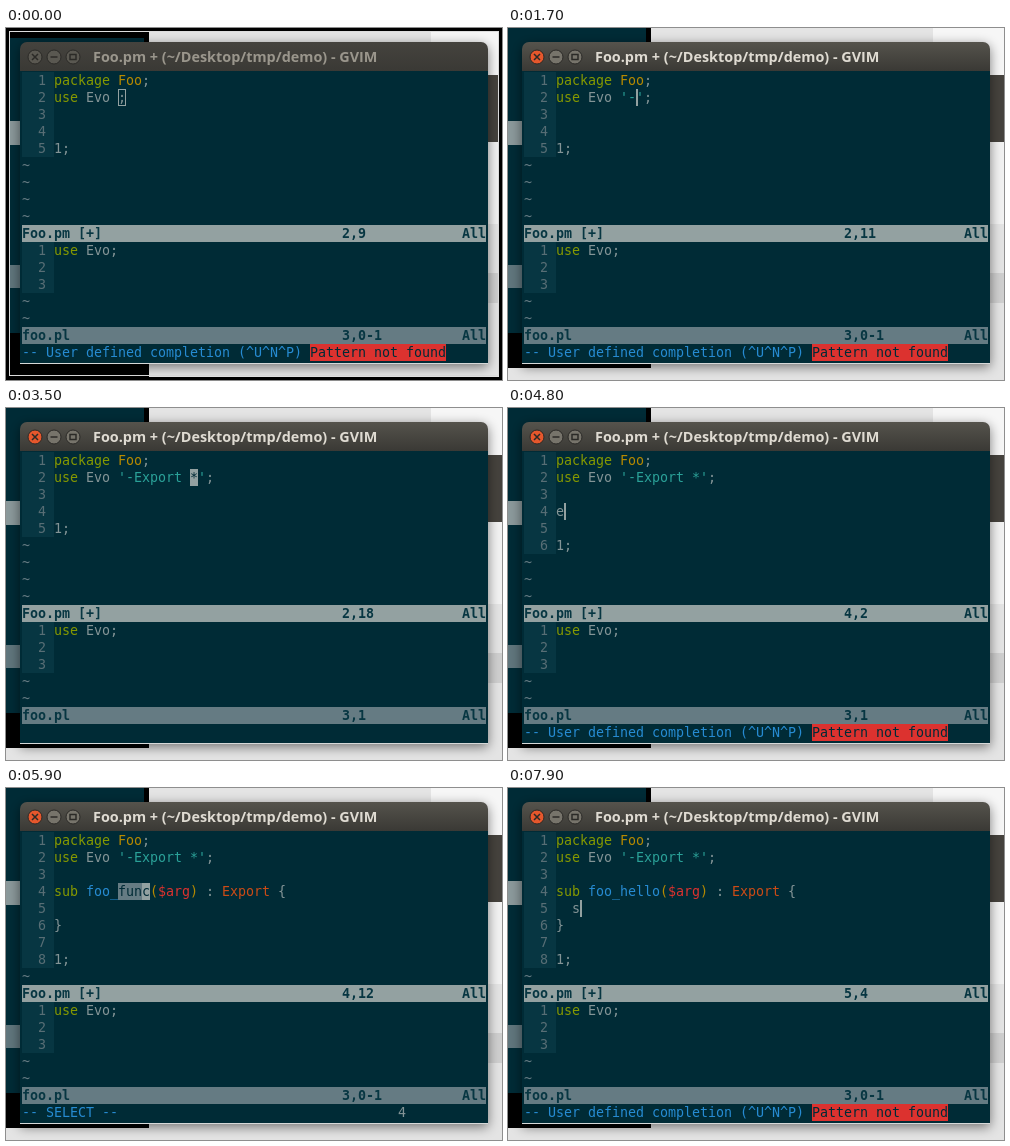
These frames come from a looping animation (496x352 px, 8000 ms). An HTML page with a canvas:

```html
<!DOCTYPE html>
<html lang="en">
<head>
<meta charset="utf-8">
<style>
html, body { margin: 0; width: 100%; height: 100%; overflow: hidden; background: #e4e4e4; }
canvas { display: block; }
</style>
</head>
<body>
<canvas width="496" height="352"></canvas>
<script>
const ctx = document.querySelector('canvas').getContext('2d');
const LOOP = 8000, X0 = 16, Y0 = 44, CW = 8, RH = 17;
const C = {
  bg: '#002b36', gutter: '#073642', num: '#586e75', dim: '#657b83', fg: '#839496',
  light: '#93a1a1', green: '#859900', yellow: '#b58900', orange: '#cb4b16',
  red: '#dc322f', cyan: '#2aa198', blue: '#268bd2'
};
const COMPLETION = '-- User defined completion (^U^N^P) ';
const ERROR = 'Pattern not found';
const SYNTAX = [
  [/^'/, C.cyan], [/^(use|package|sub)$/, C.green], [/^Foo$|^[()]$/, C.yellow],
  [/^foo_/, C.blue], [/^\$/, C.red], [/^Export$/, C.orange]
];

// Each step lists only what changes from the one before it.
const steps = [];
const step = (t, change) => steps.push({ ...steps.at(-1), ...change, t });
const sub = name => [`sub foo_${name}($arg) : Export {`, '', '}', ''];

step(0, { use: ';', body: [''], row: 2, col: 8, mode: 'hollow', msg: 'error', other: '3,0-1' });
step(100, { mode: 'insert' });
step(1300, { use: "'';", col: 9 });
const flags = '-Export *';
[1600, 1900, 2100, 2200, 2300, 2400, 2500, 2700, 2900].forEach((t, i) =>
  step(t, { use: `'${flags.slice(0, i + 1)}';`, col: 10 + i }));
step(3200, { col: 17, mode: 'normal', msg: '', other: '3,1' });
step(3800, { row: 3, col: 0 });
step(4300, { body: ['', ''], row: 4, mode: 'insert', msg: '-- INSERT --' });
[4700, 5000, 5200].forEach((t, i) =>
  step(t, { body: ['exp'.slice(0, i + 1), ''], col: i + 1, msg: 'error' }));
step(5500, { body: sub('func'), col: 11, mode: 'select', msg: '-- SELECT --', other: '3,0-1' });
[6200, 6400, 6600, 6700, 6900].forEach((t, i) =>
  step(t, { body: sub('hello'.slice(0, i + 1)), col: 9 + i, mode: 'insert', msg: 'error' }));
step(7300, { body: [sub('hello')[0], '  ', '}', ''], row: 5, col: 2, msg: '-- INSERT --' });
step(7800, { body: [sub('hello')[0], '  s', '}', ''], col: 3, msg: 'error' });

function rect(x, y, w, h, color) {
  ctx.fillStyle = color;
  ctx.fillRect(x, y, w, h);
}

function cells(row, col, n, color) {
  rect(X0 + col * CW, Y0 + row * RH, n * CW, RH, color);
}

function text(row, col, str, color, bold) {
  ctx.font = `${bold ? 'bold ' : ''}13.33px "DejaVu Sans Mono", monospace`;
  ctx.fillStyle = color;
  [...str].forEach((ch, i) => ctx.fillText(ch, X0 + (col + i) * CW, Y0 + row * RH + 13));
}

function code(row, number, str) {
  cells(row, 0, 4, C.gutter);
  text(row, 2, String(number), C.num);
  const tokens = /'[^']*'|\b(?:use|package|sub)\b|Foo|foo_\w*|\$\w+|Export|./g;
  for (const m of str.matchAll(tokens)) {
    const rule = SYNTAX.find(([re]) => re.test(m[0]));
    text(row, 4 + m.index, m[0], rule ? rule[1] : C.fg);
  }
}

function status(row, name, pos, color) {
  cells(row, 0, 58, color);
  text(row, 0, name, C.gutter, true);
  text(row, 40, pos, C.gutter, true);
  text(row, 55, 'All', C.gutter, true);
}

function mark(row, col, ch, back, color) {
  cells(row, col, 1, back);
  text(row, col, ch, color);
}

function desktop(framed) {
  rect(0, 0, 496, 352, '#e4e4e4');
  rect(425, 0, 71, 47, '#f6f6f6');
  rect(0, 0, 138, 305, C.bg);
  rect(138, 0, 5, 340, '#000');
  rect(0, 93, 15, 24, '#8b999b');
  rect(0, 237, 15, 23, '#60767d');
  rect(0, 305, 143, framed ? 47 : 35, '#000');
  rect(482, 47, 14, 67, '#45423d');
  rect(482, 114, 14, 82, '#f2f2f2');
  rect(482, 245, 14, 30, '#cfcfcf');
  if (!framed) return;
  rect(4, 4, 134, 6, '#000');
  ctx.lineWidth = 1;
  ctx.strokeStyle = '#ddd';
  ctx.strokeRect(3.5, 3.5, 489, 344);
  ctx.lineWidth = 3;
  ctx.strokeStyle = '#000';
  ctx.strokeRect(1.5, 1.5, 493, 349);
}

function button(x, fill, icon) {
  ctx.beginPath();
  ctx.arc(x, 29, 7, 0, 7);
  ctx.fillStyle = fill;
  ctx.fill();
  ctx.lineWidth = 1;
  ctx.strokeStyle = '#2b2a27';
  ctx.stroke();
  ctx.lineWidth = 1.5;
  ctx.stroke(new Path2D(`M${x} 29${icon}`));
}

function frame(focused) {
  ctx.save();
  ctx.shadowColor = 'rgba(0,0,0,.5)';
  ctx.shadowBlur = 12;
  ctx.shadowOffsetY = 3;
  const bar = ctx.createLinearGradient(0, 14, 0, 43);
  bar.addColorStop(0, focused ? '#55534c' : '#45433e');
  bar.addColorStop(1, '#3a3935');
  ctx.fillStyle = bar;
  ctx.beginPath();
  ctx.roundRect(14, 14, 468, 322, [7, 7, 0, 0]);
  ctx.fill();
  ctx.restore();
  rect(14, 43, 468, 292, C.bg);
  rect(14, 335, 468, 1, '#d5d8d8');
  const grey = focused ? '#77746b' : '#5a5851';
  button(29, focused ? '#e6572c' : grey, 'm-3-3l6 6m0-6l-6 6');
  button(48, grey, 'm-3.5 0h7');
  button(67, grey, 'm-3-2.5h6v5h-6z');
  ctx.font = 'bold 14.4px "Open Sans", sans-serif';
  ctx.fillStyle = focused ? '#dfdbd2' : '#9a968c';
  ctx.fillText('Foo.pm + (~/Desktop/tmp/demo) - GVIM', 87, 34);
}

function cursor(s, line, age) {
  const row = s.row - 1, col = s.col + 4, ch = line[s.col] || ' ';
  const x = X0 + col * CW, y = Y0 + row * RH;
  if (s.mode === 'insert' && ch === '(') {
    mark(row, col, '(', C.num, C.red);
    mark(row, line.indexOf(')') + 4, ')', C.num, C.red);
  }
  if (s.mode === 'select') {
    cells(row, col - 3, 4, C.dim);
    text(row, col - 3, 'func', C.bg);
  }
  if (s.mode === 'hollow') {
    ctx.lineWidth = 1;
    ctx.strokeStyle = C.light;
    ctx.strokeRect(x + .5, y + .5, CW - 1, RH - 1);
    return;
  }
  const lit = age < 700 || (age - 700) % 650 >= 250;
  if (!lit) return;
  if (s.mode === 'insert') rect(x, y, 2, RH, C.light);
  else mark(row, col, ch, C.light, C.bg);
}

function draw(t) {
  const s = steps.findLast(e => e.t <= t);
  const lines = ['package Foo;', 'use Evo ' + s.use, '', ...s.body, '1;'];
  const focused = s.mode !== 'hollow';
  desktop(!focused);
  frame(focused);

  for (let r = 0; r < 9; r++) {
    if (r < lines.length) code(r, r + 1, lines[r]);
    else text(r, 0, '~', C.dim);
  }
  const line = lines[s.row - 1];
  const col = s.mode === 'normal' && !line ? '0-1' : s.col + 1;
  status(9, 'Foo.pm [+]', `${s.row},${col}`, C.light);

  ['use Evo;', '', ''].forEach((str, i) => code(10 + i, i + 1, str));
  text(13, 0, '~', C.dim);
  text(14, 0, '~', C.dim);
  status(15, 'foo.pl', s.other, C.dim);

  if (s.msg === 'error') {
    text(16, 0, COMPLETION, C.blue);
    cells(16, COMPLETION.length, ERROR.length, C.red);
    text(16, COMPLETION.length, ERROR, C.bg);
  } else {
    text(16, 0, s.msg, C.blue);
    if (s.mode === 'select') text(16, 47, '4', C.fg);
  }
  cursor(s, line, t - s.t);
}

const start = performance.now();
function tick() {
  draw((performance.now() - start) % LOOP);
  requestAnimationFrame(tick);
}
tick();
</script>
</body>
</html>
```
